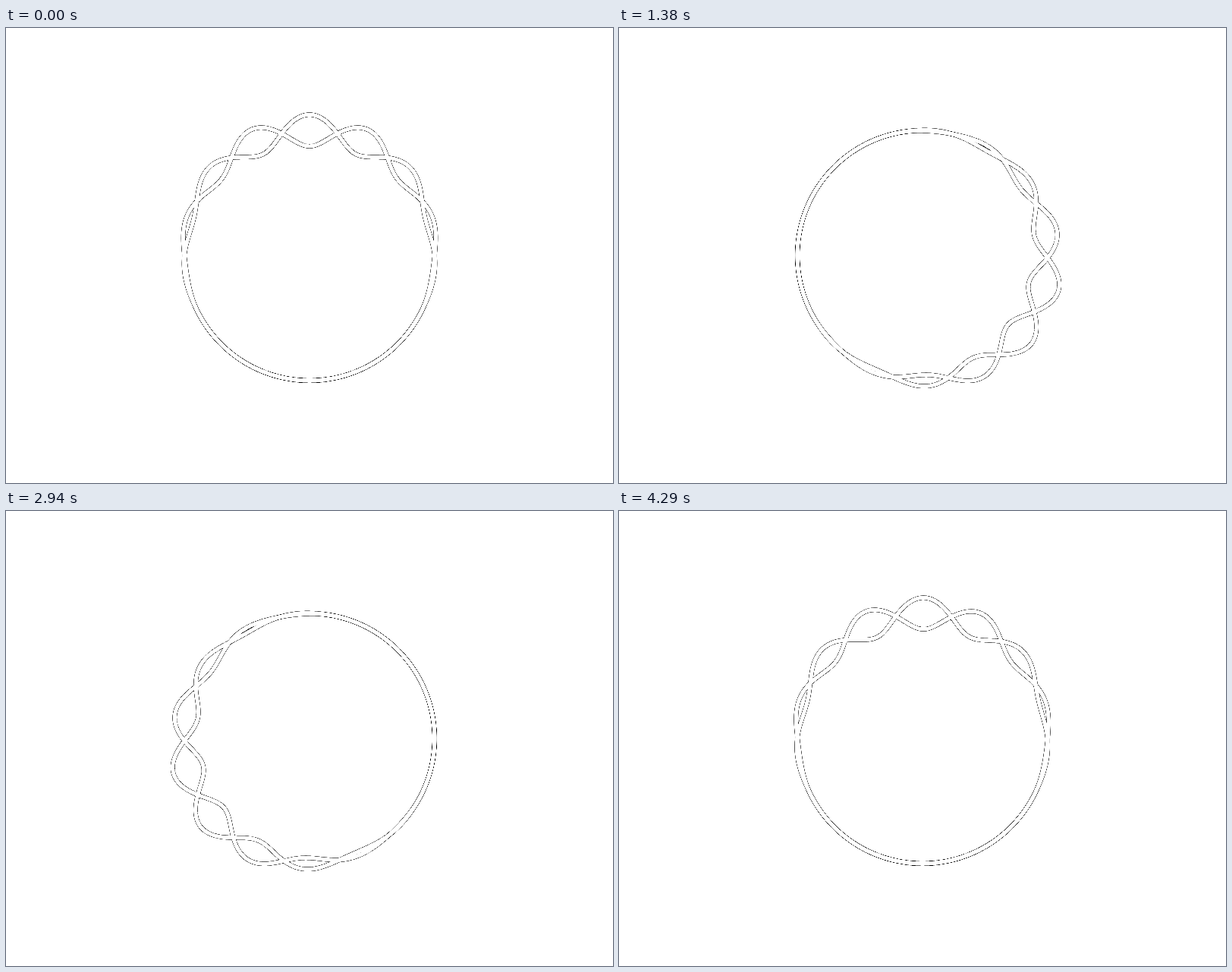
These frames come from a looping animation (800 by 600 pixels, 4320 ms). An HTML page with a canvas:

```html
<!DOCTYPE html>
<html lang="en">
<head>
<meta charset="utf-8">
<title>Braided ring</title>
<style>
html, body { margin: 0; height: 100%; overflow: hidden; background: #fff; }
/* Contrast drops the faint edge pixels, which leaves fine, broken hairlines. */
canvas { display: block; filter: contrast(2.5); }
</style>
</head>
<body>
<canvas id="stage" width="800" height="600"></canvas>
<script>
const ctx = document.getElementById('stage').getContext('2d');
const LOOP = 4320, STEP = 30, TAU = 2 * Math.PI;
const RADIUS = 164.9, SWING = 20.8, WAVES = 7, POINTS = 720;

// Angles run clockwise from the top; the bulge goes once round per loop
// while the waves slip back by one and a half periods.
function strand(side, p) {
  const path = new Path2D();
  for (let i = 0; i < POINTS; i++) {
    const a = TAU * i / POINTS;
    const bulge = Math.cos((a - TAU * p) / 2) ** 6;
    const r = RADIUS + side * SWING * bulge * Math.cos(WAVES * a + 1.5 * TAU * p);
    path.lineTo(400 + r * Math.sin(a), 300 - r * Math.cos(a));
  }
  path.closePath();
  return path;
}

function draw(now) {
  const p = Math.floor(now % LOOP / STEP) * STEP / LOOP;
  const strands = [strand(1, p), strand(-1, p)];
  ctx.fillStyle = '#fff';
  ctx.fillRect(0, 0, 800, 600);
  ctx.lineJoin = 'round';
  // Both outlines lie below both bands, so the bands merge where they cross.
  for (const [color, width] of [['#000', 6], ['#fff', 5]]) {
    ctx.strokeStyle = color;
    ctx.lineWidth = width;
    strands.forEach(s => ctx.stroke(s));
  }
}

const start = performance.now();
function tick() {
  draw(performance.now() - start);
  requestAnimationFrame(tick);
}
tick();
</script>
</body>
</html>
```
